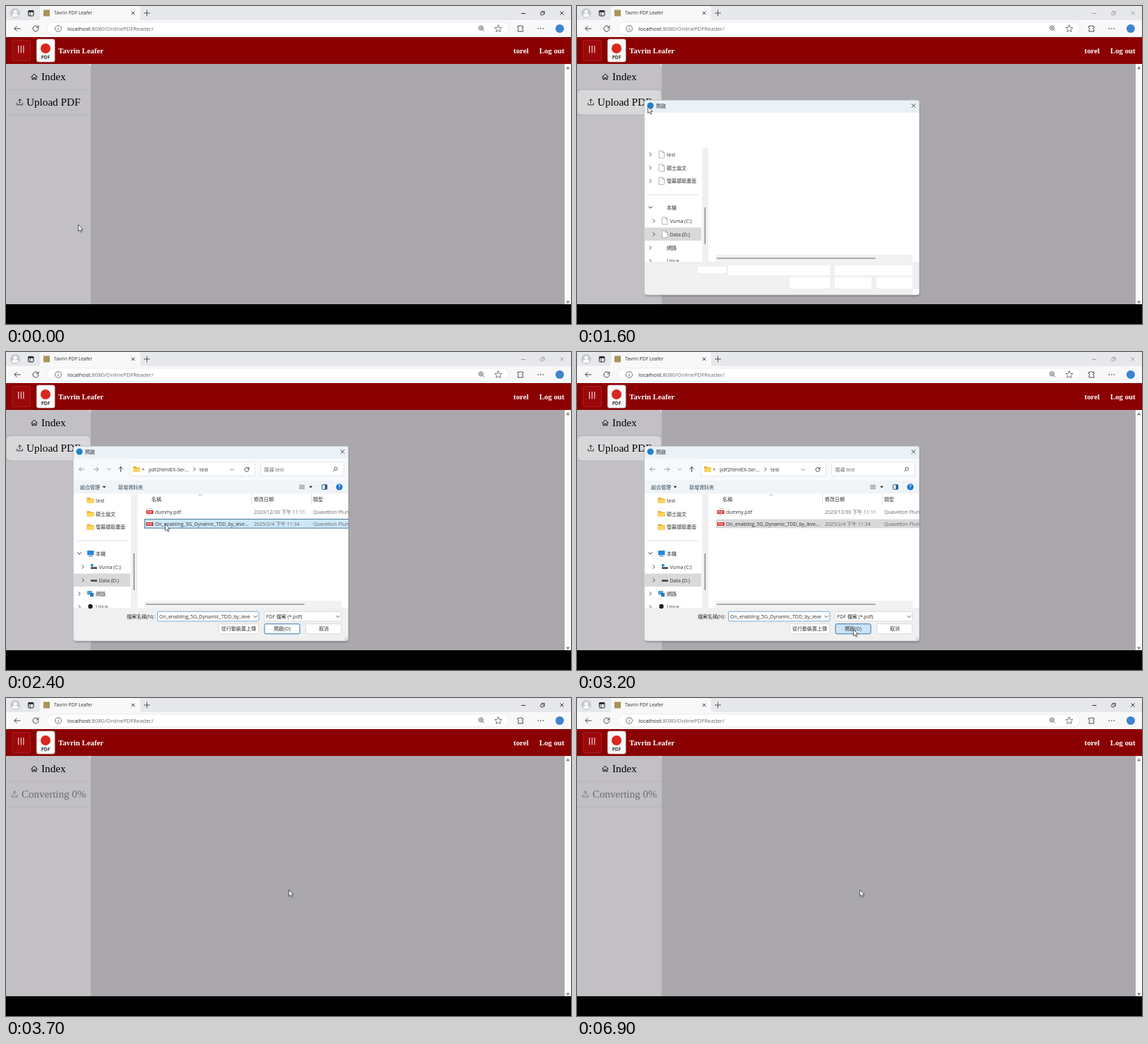
An HTML page that plays this animation: 800x450 px, repeating every 8 s.

```html
<!DOCTYPE html>
<html lang="en">
<head>
<meta charset="utf-8">
<title>Tavrin PDF Leafer</title>
<style>
  html, body { margin: 0; width: 100%; height: 100%; overflow: hidden; background: #000; }
  svg { display: block; width: 100%; height: 100%; }
  text { white-space: pre; }
  .ui { font-family: "Open Sans", "Noto Sans CJK TC", "Noto Sans CJK", sans-serif; font-size: 7px; fill: #333; }
  .serif { font-family: "Liberation Serif", serif; }
  .bold { font-weight: bold; font-size: 10.8px; fill: #fff; }
  .nav { font-size: 15.2px; }
</style>
</head>
<body>
<svg id="stage" viewBox="0 0 800 450"></svg>
<script>
const LOOP = 8000, STEP = 100;

// Markup helpers
const rect = (x, y, w, h, fill, more = '') =>
  `<rect x="${x}" y="${y}" width="${w}" height="${h}" fill="${fill}" ${more}/>`;
const line = (d, color = '#333', w = 1) =>
  `<path d="${d}" fill="none" stroke="${color}" stroke-width="${w}" stroke-linecap="round" stroke-linejoin="round"/>`;
const shape = (d, fill) => `<path d="${d}" fill="${fill}"/>`;
const dot = (x, y, r, fill, more = '') => `<circle cx="${x}" cy="${y}" r="${r}" fill="${fill}" ${more}/>`;
const text = (x, y, s, more = '', cls = 'ui') => `<text class="${cls}" x="${x}" y="${y}" ${more}>${s}</text>`;
const group = (id, body, more = '') => `<g id="${id}" ${more}>${body}</g>`;
const border = (color, r = 0, w = 0.8) => `stroke="${color}" stroke-width="${w}" rx="${r}"`;
const mid = 'text-anchor="middle"';

// Small icons
const cross = (x, y, r, c = '#333') => line(`M${x - r} ${y - r}l${2 * r} ${2 * r}m0 ${-2 * r}l${-2 * r} ${2 * r}`, c, 0.9);
const arrow = (x, y, s, c = '#333', turn = 0) =>
  `<g transform="translate(${x} ${y}) rotate(${turn})">${line(`M${s} 0H${-s}l${s * 0.8} ${-s * 0.8}M${-s} 0l${s * 0.8} ${s * 0.8}`, c, 0.9)}</g>`;
const right = (x, y, c = '#444') => line(`M${x - 1.2} ${y - 2.4}l2.4 2.4l-2.4 2.4`, c, 0.9);
const down = (x, y, c = '#444') => line(`M${x - 2.4} ${y - 1.2}l2.4 2.4l2.4 -2.4`, c, 0.9);
const solidDown = (x, y) => shape(`M${x - 2.4} ${y - 1.2}h4.8l-2.4 2.8z`, '#222');
const reload = (x, y, r, c = '#333') =>
  line(`M${x + r * 0.8} ${y - r * 0.6}A${r} ${r} 0 1 0 ${x + r} ${y + 0.4}M${x + r} ${y - r}v${r * 0.7}h${-r * 0.7}`, c, 0.9);
const lens = (x, y, r, sx = 1) =>
  dot(x, y, r, 'none', 'stroke="#555" stroke-width=".9"') + line(`M${x + sx * r * 0.7} ${y + r * 0.7}l${sx * 2.2} 2.2`, '#555', 0.9);
const folder = (x, y) => shape(`M${x} ${y - 4}h4l1.2 1.4h4.8v6.6h-10z`, '#e8b02e') + rect(x, y - 1.6, 10, 5.6, '#fcd462', 'rx=".6"');
const sheet = (x, y) =>
  `<path d="M${x} ${y - 5}h5l2.5 2.5v7.5h-7.5zM${x + 5} ${y - 5}v2.5h2.5" fill="#fff" stroke="#999" stroke-width=".7"/>`;
const pdfIcon = (x, y) =>
  rect(x + 1, y - 4.5, 8, 9, '#fff', border('#b9b9b9', 0.8, 0.6)) + rect(x, y - 2, 10, 5, '#d02424', 'rx=".7"') +
  text(x + 5, y + 2, 'PDF', mid + ' style="font-size:3.8px;font-weight:700;fill:#fff"');
const drive = (x, y) => rect(x, y - 1.2, 9, 2.8, '#4b4b4b', 'rx=".8"');
const upload = (x, y, c) => line(`M${x} ${y + 1.5}v-5.5m-2.2 2l2.2 -2.2l2.2 2.2M${x - 3.8} ${y + 1.3}v2.6h7.6v-2.6`, c, 0.9);

const GREY = '#6c6b6e';

const browser = () =>
  rect(0, 0, 800, 21, '#e6e8ec') + rect(0, 20, 800, 24, '#f8f8f9') +
  shape('M45 20q3 0 3 -3V3q0 -3 3 -3H187q3 0 3 3v14q0 3 3 3z', '#f8f8f9') +
  dot(13, 10, 7, '#c6c9cf') + dot(13, 8, 2.5, '#fff') + shape('M8.5 14.2q0 -3.4 4.5 -3.4t4.5 3.4q-4.5 2.6 -9 0z', '#fff') +
  rect(31.5, 6.5, 7.5, 7.5, 'none', border('#222', 1.2, 1)) + rect(31.5, 6.5, 7.5, 2.2, '#222') + line('M34 8v5.5', '#222', 0.8) +
  rect(53, 5.5, 9, 9, '#a8935a') +
  text(68, 12.4, 'Tavrin PDF Leafer', 'style="font-size:6.7px"') +
  cross(180, 10, 2) + line('M195.5 10h8m-4 -4v8', '#444', 0.9) +
  arrow(16, 32, 4.2) + reload(42, 32, 4) +
  rect(58, 23, 654, 18, '#fff', border('#e3e4e6', 9, 0.7)) +
  dot(74, 32, 4.4, 'none', 'stroke="#666" stroke-width=".9"') + line('M74 31.6v2.4m0 -4.4v.1', '#555', 0.9) +
  text(87, 34.6, '<tspan fill="#222">localhost</tspan><tspan fill="#6a6a6a">:8080/OnlinePDFReader/</tspan>', 'style="font-size:7.75px"') +
  lens(672.5, 31, 3) + line('M671 31h3m-1.5 -1.5v3', '#555', 0.7) +
  line('M697 27l1.5 3.2l3.5 .4l-2.6 2.4l.7 3.5l-3.1 -1.8l-3.1 1.8l.7 -3.5l-2.6 -2.4l3.5 -.4z', '#555', 0.8) +
  line('M725 28.5h2.3q.8 -2.4 2.4 0h2.3v2.4q-2.6 .8 0 2.4v2.7h-7v-2.7q2.4 -.8 0 -2.4z', '#333', 0.9) +
  [753.5, 757, 760.5].map(x => dot(x, 32, 0.8, '#333')).join('') +
  dot(784, 32, 6, '#3f83cf') +
  group('controls', line('M730 10.5h5') + rect(757, 8.8, 4, 4, 'none', border('currentColor', 0.8)) +
    line('M758.5 7.5h4v4', 'currentColor', 0.8) + cross(787, 10, 2.3, 'currentColor'));

const page = () =>
  rect(0, 44, 800, 38, '#8b0000') +
  rect(8.5, 48.5, 26, 29, '#9d080b', border('#b32427', 2, 0.8)) +
  [17.7, 21.3, 24.9].map(x => line(`M${x} 56.5v9.5`, '#fff', 1)).join('') +
  rect(43.5, 47, 25.5, 32, '#fbfbfb', border('#d0cfcf', 2.5, 0.8)) + dot(56, 60, 7, '#d8281f') +
  text(56, 75.3, 'PDF', mid + ' style="font-size:6.6px;font-weight:700;fill:#333"') +
  text(74, 66.8, 'Tavrin Leafer', '', 'serif bold') +
  text(740, 66.8, 'torel', 'text-anchor="end"', 'serif bold') + text(755, 66.8, 'Log out', '', 'serif bold') +
  rect(0, 82, 120, 340, '#c2c0c4') + rect(120, 82, 671, 340, '#aaa8ad') +
  shape('M116 82h4v4q-.5 -3 -4 -4z', '#e4e3e5') +
  rect(791, 82, 9, 340, '#fbfbfb') +
  shape('M793 89.3l2.6 -4l2.6 4z', '#858585') + shape('M793 417.5l2.6 4l2.6 -4z', '#858585') +
  rect(0, 117.6, 120, 0.9, '#b0aeb3') + rect(0, 153.5, 120, 0.9, '#b0aeb3') +
  line('M35.8 100.2l4.2 -4l4.2 4m-7.2 -.6v4.4h2v-2.6h2v2.6h2v-4.4', '#111', 1) +
  text(50, 105.3, 'Index', '', 'serif nav') +
  group('hover', rect(1, 119, 118, 34.4, '#d8d7da', 'rx="6"')) +
  group('upload', upload(19.5, 136, '#222') + text(29, 141.3, 'Upload PDF', '', 'serif nav')) +
  group('convert', upload(12, 136, GREY) + text(22, 141.3, 'Converting 0%', `style="font-size:15px" fill="${GREY}"`, 'serif nav'));

const field = (x, y, w, h, c = '#d2d2d2') => rect(x, y, w, h, '#fff', border(c, 1.5));

const tree = () =>
  ['test', '碩士論文', '螢幕擷取畫面'].map((s, i) => text(127, 212.7 + i * 18.8, s)).join('') +
  rect(100, 266.6, 72, 0.8, '#d4d4d4') +
  rect(96, 313.5, 80, 18.5, '#d9d9d9') +
  down(104, 285, '#111') + text(127, 287.8, '本機') +
  right(109, 304) + text(131.5, 306.5, 'Vuma (C:)') +
  right(109, 323) + text(131.5, 325.5, 'Data (D:)') +
  right(104, 342) + text(127, 344.5, '網路') +
  right(104, 361) + text(127, 363.2, 'Linux');

const blankParts = () =>
  [210, 229, 247.5].map(y => right(104, y) + sheet(116, y)).join('') + sheet(120.5, 304) + sheet(120.5, 323) +
  [[171, 369, 40, 9], [214, 367, 144, 14], [365, 367, 110, 14], [301, 384, 57, 15.5], [365, 384, 52, 15.5], [424, 384, 51, 15.5], [475, 400, 10, 9]]
    .map(b => rect(...b, '#fff')).join('');

const fullParts = () =>
  rect(95, 151, 390, 31, '#f7fafc') + rect(95, 182, 390, 18.5, '#f0f4f7') +
  arrow(107, 166, 3.4, '#888') + arrow(127.5, 166, 3.4, '#888', 180) + down(145.5, 166, '#888') + arrow(162.5, 166, 3.4, '#333', 90) +
  field(175.5, 156, 177, 19.5, '#dde1e4') + folder(180, 166) + text(192.5, 168.3, '«') +
  text(202, 168.5, 'pdf2htmlEX-Ser...') + right(267, 166) + text(274, 168.5, 'test') + down(320, 166.5, '#777') + reload(341, 166.3, 3) +
  field(360.5, 156, 118, 19.5, '#dde1e4') + text(365.5, 168.5, '搜尋 test', 'style="fill:#666"') + lens(467, 165.3, 2.2, -1) +
  text(105, 193.5, '組合管理', 'style="fill:#345"') + solidDown(139, 191) + text(159, 193.5, '新增資料夾', 'style="fill:#345"') +
  line('M415.5 188.8h7m-7 2.2h7m-7 2.2h7', '#555', 0.8) + solidDown(431.5, 191) +
  rect(447.5, 187.8, 7, 6.5, '#fff', border('#235a8c', 0.6, 1)) + rect(451.5, 188, 3, 6, '#235a8c') +
  dot(472, 191, 4.6, '#1976d2') + text(472, 193.3, '?', mid + ' style="font-size:6.5px;font-weight:700;fill:#fff"') +
  [210, 229, 247.5].map(y => folder(114.5, y)).join('') +
  rect(115, 281, 9.5, 6.5, '#2b8ad6', 'rx=".8"') + rect(117, 288.5, 5.5, 1, '#667') +
  rect(120, 300, 3.5, 3.5, '#1e90e0') + drive(120, 305.5) + drive(120, 323.5) +
  rect(115, 338, 7, 5.5, '#4a9fdc', 'rx=".8"') + rect(119, 341, 5, 5, '#2b79b8') + dot(119.5, 360, 3.2, '#222') +
  text(171, 376.5, '檔案名稱(N):') + field(214.5, 367.3, 143.5, 13.6, '#5a9bd0') + down(353, 374.5) +
  field(365.5, 367.3, 109.5, 13.6) + text(368, 376.7, 'PDF 檔案 (*.pdf)') + down(470, 374.5) +
  field(301.5, 384.8, 56, 14) + text(329.5, 394.4, '從行動裝置上傳', mid) +
  rect(366, 384.8, 50, 14, '#fdfdfd', 'id="open" ' + border('#2f78b7', 2, 1)) + text(391, 394.4, '開啟(O)', mid) +
  field(424.5, 384.8, 50, 14) + text(450, 394.4, '取消', mid) +
  line('M479.5 407.5l4 -4m-1.5 4l1.5 -1.5', '#aaa', 0.8);

const fileRow = (y, name, date) =>
  pdfIcon(198.5, y) + text(211, y + 2.6, name, 'style="font-size:6.9px"') +
  text(351, y + 2.6, date, 'style="fill:#666"') + text(435, y + 2.6, 'Quavelton Plume', 'style="fill:#666"');

const fileParts = () =>
  line('M273 203l2 -1.7l2 1.7', '#777', 0.7) +
  text(206, 210.8, '名稱') + text(351, 210.8, '修改日期') + text(435, 210.8, '類型') +
  rect(347, 201, 0.8, 15, '#dcdcdc') + rect(432, 201, 0.8, 15, '#dcdcdc') +
  rect(196.5, 236.6, 292, 12.6, 'none', 'id="row"') +
  fileRow(226, 'dummy.pdf', '2023/12/30 下午 11:11') +
  fileRow(243, 'On_enabling_5G_Dynamic_TDD_by_leve...', '2025/2/4 下午 11:34') +
  group('chosen', text(217, 376.7, 'On_enabling_5G_Dynamic_TDD_by_leve'), 'clip-path="url(#fieldClip)"');

const dialog = () => group('dialog',
  rect(95, 133.5, 391, 278, '#000', 'rx="5" opacity=".16"') +
  `<g clip-path="url(#boxClip)">` +
  rect(95, 133, 390, 276, '#fff') + rect(95, 133, 390, 18, '#eaf2f8') +
  dot(104, 141, 4.6, '#2382c8') + text(112, 143.6, '開啟') + cross(476.5, 141, 2.5) +
  rect(177, 200.5, 9, 162, '#f0f0f0') + rect(180.6, 285, 1.5, 52, '#888') +
  tree() + rect(196, 352, 279, 10, '#f2f2f2') + rect(198, 356.4, 224.5, 1.3, '#888') +
  rect(95, 362, 390, 47, '#f0f0f0') +
  group('blank', blankParts()) + group('full', fullParts()) + group('files', fileParts()) +
  '</g>' + rect(95.3, 133.2, 389.6, 275.8, 'none', border('#a5a5aa', 4, 0.6)));

const stage = document.getElementById('stage');
stage.innerHTML =
  '<defs><clipPath id="boxClip">' + rect(95, 133, 390, 276, '#000', 'rx="4"') + '</clipPath>' +
  '<clipPath id="fieldClip">' + rect(215, 367, 133, 14, '#000') + '</clipPath></defs>' +
  rect(0, 0, 800, 450, '#000') + browser() + page() + dialog() +
  group('cursor', '<path d="M.4 .4v9.4l2.2 -2l1.5 3.4l1.6 -.7l-1.5 -3.3h2.9z" fill="#fff" stroke="#333" stroke-width=".8" stroke-linejoin="round"/>');

const el = id => document.getElementById(id);
const show = (id, on) => el(id).setAttribute('display', on ? 'inline' : 'none');

// Pointer stops: time, x, y
const PATH = [
  [0, 102, 309], [500, 66, 133], [1400, 66, 133], [1600, 100, 142], [2200, 225, 243],
  [2500, 225, 243], [3000, 391, 392], [3300, 391, 392], [3700, 400, 271], [LOOP, 400, 271]
];

function pointer(t) {
  const i = PATH.findIndex(p => p[0] > t);
  const [t0, x0, y0] = PATH[i - 1], [t1, x1, y1] = PATH[i];
  const u = (t - t0) / (t1 - t0), e = u * u * (3 - 2 * u);
  return [x0 + (x1 - x0) * e, y0 + (y1 - y0) * e];
}

function rowStyle(t, y) {
  if (t >= 3100) return ['#d9d9d9', 'none'];
  if (t >= 2300) return ['#cce8f8', '#356a8c'];
  return [y > 236 && y < 250 ? '#e5f3ff' : 'none', 'none'];
}

function draw(t) {
  const [x, y] = pointer(t);
  const open = t >= 1600 && t < 3400;
  const inactive = t >= 1500 && t < 3400;
  const converting = t >= 3500;
  el('cursor').setAttribute('transform', `translate(${x.toFixed(1)} ${y.toFixed(1)})`);
  el('controls').setAttribute('color', inactive ? '#999' : '#222');
  el('controls').firstChild.setAttribute('stroke', inactive ? '#999' : '#222');
  show('hover', !converting && (inactive || (y > 119 && y < 153 && x < 120)));
  show('upload', !converting);
  show('convert', converting);
  show('dialog', open);
  show('blank', t < 1700);
  show('full', t >= 1700);
  show('files', t >= 1800);
  show('chosen', t >= 2300);
  const [fill, edge] = rowStyle(t, y);
  el('row').setAttribute('fill', fill);
  el('row').setAttribute('stroke', edge);
  el('row').setAttribute('stroke-width', 0.9);
  el('open').setAttribute('fill', y > 384 && x > 366 ? '#cde4f5' : '#fdfdfd');
}

const start = performance.now();
function frame(now) {
  const t = Math.max(0, now - start) % LOOP;
  draw(Math.floor(t / STEP) * STEP);
  requestAnimationFrame(frame);
}
draw(0);
requestAnimationFrame(frame);
</script>
</body>
</html>
```
